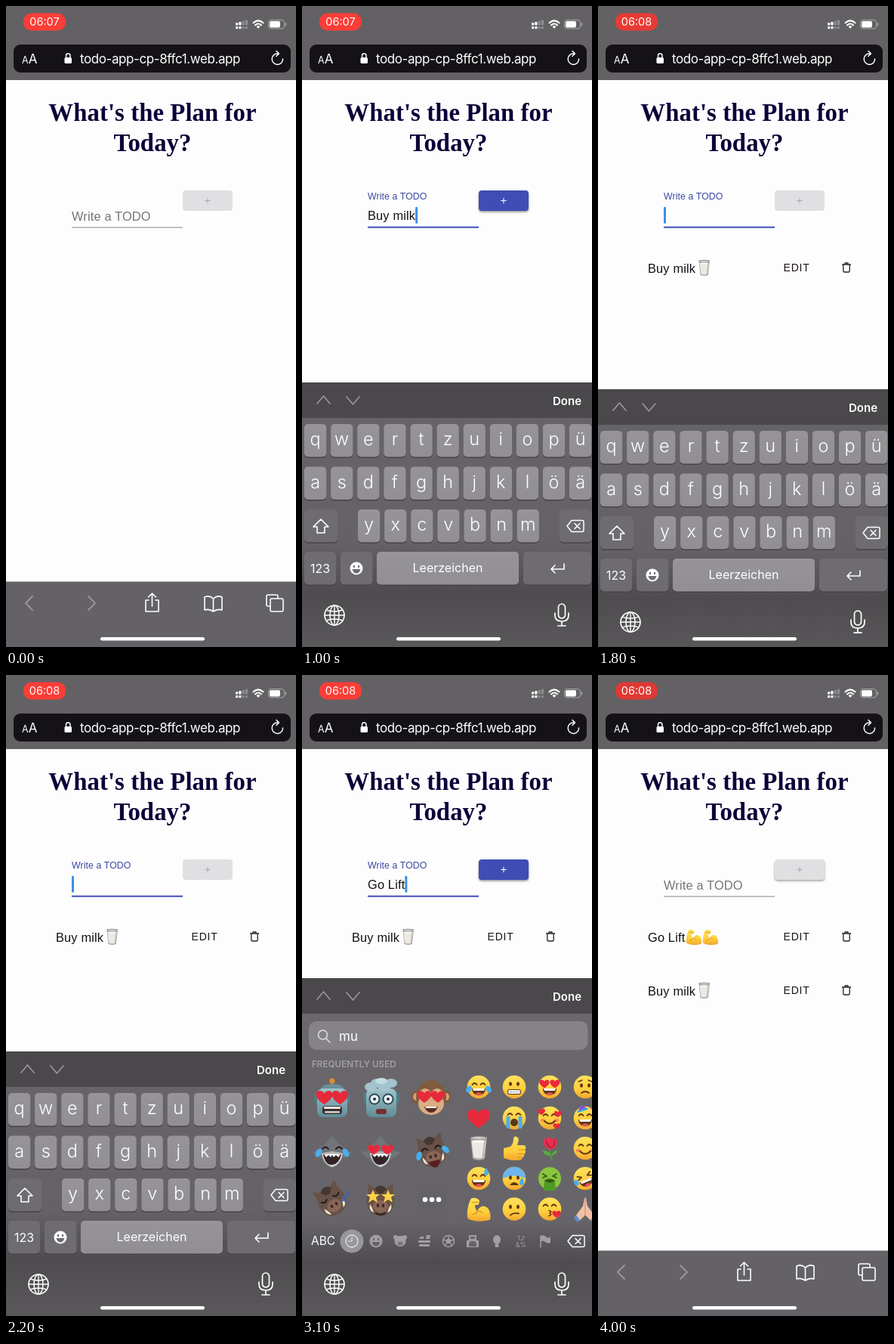
Recreate the animation shown at these times as an HTML page. Size 384 px wide and 848 px high, loop 4100 ms.

```html
<!DOCTYPE html>
<html lang="en">
<head>
<meta charset="utf-8">
<title>Todo app</title>
<style>
html, body { margin: 0; width: 100%; height: 100%; overflow: hidden; background: #fdfdfd; }
svg { display: block; }
text { white-space: pre; }
.ui { font-family: Inter, Roboto, sans-serif; }
.web { font-family: "Liberation Sans", Arial, sans-serif; letter-spacing: .15px; font-size: 16.4px; }
.head { font: bold 32.8px "Liberation Serif", "Times New Roman", serif; letter-spacing: .06px; }
</style>
</head>
<body>
<svg id="stage" width="384" height="848" viewBox="0 0 384 848"></svg>
<script>
const LOOP = 4100, STEP = 100;
const WHITE = '#fff', BLUE = '#3f4db5', BROWN = '#5f3713', TEAR = '#4aaef0', RED = '#e8293c';

const fill = (d, c, more = '') => `<path d="${d}" fill="${c}" ${more}/>`;
const line = (d, c, w = 1.6, more = '') =>
  `<path d="${d}" fill="none" stroke="${c}" stroke-width="${w}" stroke-linecap="round" stroke-linejoin="round" ${more}/>`;
const box = (x, y, w, h, r, c, more = '') => `<rect x="${x}" y="${y}" width="${w}" height="${h}" rx="${r}" fill="${c}" ${more}/>`;
const dot = (x, y, rx, c, ry = rx) => `<ellipse cx="${x}" cy="${y}" rx="${rx}" ry="${ry}" fill="${c}"/>`;
const ring = (x, y, r, c, w = 1.6) => `<circle cx="${x}" cy="${y}" r="${r}" fill="none" stroke="${c}" stroke-width="${w}"/>`;
const at = (x, y, s, body) => `<g transform="translate(${x} ${y}) scale(${s})">${body}</g>`;
const turn = (deg, body) => `<g transform="rotate(${deg})">${body}</g>`;
const label = (x, y, size, str, c = WHITE, more = '') =>
  `<text class="ui" x="${x}" y="${y}" font-size="${size}" fill="${c}" ${more}>${str}</text>`;
const mid = (x, y, size, str, c = WHITE, more = '') => label(x, y, size, str, c, 'text-anchor="middle" ' + more);
const grad = (id, stops) => `<linearGradient id="${id}" x2="0" y2="1">` +
  stops.map(([o, c]) => `<stop offset="${o}" stop-color="${c}"/>`).join('') + '</linearGradient>';
const both = f => f(-1) + f(1);

// Emoji, drawn around 0,0 in a 32px box
const heart = (x, y, s) => at(x, y, s, fill('M0 10C-6 6-12 1-12-4C-12-11-3-12 0-6C3-12 12-11 12-4C12 1 6 6 0 10Z', RED));
const eyes = (y = -3, ry = 2.7) => both(k => dot(5 * k, y, 2, BROWN, ry));
const shut = (y = -3) => both(k => line(`M${5.5 * k - 3} ${y}q3-4 6 0`, BROWN, 1.8));
const grin = fill('M-9 2H9C9 14-9 14-9 2Z', BROWN) + fill('M-8 2H8L7 5H-7Z', WHITE) + fill('M-5 9.5Q0 5 5 9.5Q0 12 -5 9.5Z', '#ee5361');
const smile = line('M-7 4Q0 11 7 4', BROWN, 1.9);
const frown = line('M-5 8Q0 4 5 8', BROWN, 1.9);
const blush = both(k => dot(9 * k, 3, 3.2, '#f58a57', 2));
const face = (...parts) => '<circle r="15.3" fill="url(#yel)"/>' + parts.join('');
const drip = (x, y) => at(x, y, 1, fill('M0-5C4 0 4 5 0 5S-4 0 0-5Z', TEAR));

const emoji = {
  joy: face(shut(), grin, both(k => at(k * 13, 3, 1, turn(k * -35, dot(0, 0, 3.3, TEAR, 5))))),
  grimace: face(eyes(-4), box(-9, 3, 18, 7, 3, BROWN), box(-8, 4, 16, 5, 2, WHITE), line('M-8 6.5H8M-4 4V9M0 4V9M4 4V9', '#aaa', .7)),
  love: face(heart(-7, -4, .55), heart(7, -4, .55), grin),
  sad: face(eyes(-2), frown, line('M-9-7L-4-9M9-7L4-9', BROWN, 1.4)),
  heart: heart(0, 1, 1.25),
  sob: face(shut(-4), dot(0, 6, 5, BROWN, 5), both(k => fill(`M${k * 8 - 2.5}-2h5V13q-2 2-5 0Z`, TEAR))),
  adore: face(shut(), blush, smile, heart(-11, -8, .42), heart(11, -5, .42), heart(9, 11, .38)),
  party: face(shut(), grin, fill('M-10-8L-5-18L3-12Z', '#7c5ad6'), line('M-10-8L3-12', '#38b5e8', 2), dot(8, -13, 1.5, '#ed4a7b'), dot(13, -8, 1.5, '#46b96a')),
  sweat: face(shut(), grin, drip(10, -9)),
  thumb: fill('M-14 0L-5-2C-2-5-1-9-1-13C0-17 5-16 6-11L4-4H12C16-4 16 1 14 2C16 4 15 7 13 8C14 11 12 12 11 12C11 15 8 16 5 16H-4L-14 13Z', 'url(#yel)') +
    line('M6 2H13M5 7.5H12M5 12H10', '#d8901c', 1),
  rose: line('M1-2Q-1 8 3 15', '#4b9f3a', 2) + fill('M1 10Q-9 9-9 3Q0 3 1 10ZM2 10Q10 8 10 3Q3 4 2 10Z', '#55ad44') +
    fill('M-9-13Q-4-11-2-15Q3-11 9-13Q12-1 2 2Q-9 1-9-13Z', '#e6304f') + line('M-5-10Q-3-1 3-1Q8-5 6-10', '#aa1735', 1.2),
  blush: face(shut(), blush, smile),
  arm: fill('M-10-14C-6-16 0-14 1-11L0-6C-2-5-4-6-5-5C-5-1-3 1-2 3C1-5 9-6 13 0C16 6 16 11 15 14C6 17-6 17-14 13C-17 8-14-8-10-14Z', 'url(#yel)') +
    line('M-9-9H-1M-2 3Q-4 7-8 7M-2 3Q3 2 5 5', '#d38a18', 1.1),
  worry: face(fill('M-15.3 0A15.3 15.3 0 0 1 15.3 0Q0-7-15.3 0Z', '#6fb4ec'), eyes(-1), fill('M-6 9Q0 1 6 9Z', BROWN), drip(10, 4)),
  sick: '<circle r="15" fill="#8bc53f"/>' + line('M-9-6L-4-3L-9-1M9-6L4-3L9-1', '#355912', 1.8) + fill('M-7 2H7L8 16H-8Z', '#4e9a25') + dot(0, 3, 6, '#355912', 2.5),
  rofl: turn(-22, face(line('M-9-6L-4-3L-9-1M9-6L4-3L9-1', BROWN, 1.8), grin, dot(-13, 1, 3, TEAR, 4), dot(13, 1, 3, TEAR, 4))),
  milk: fill('M-11-15H11L8 14Q0 18-8 14Z', '#aaa6a8') + fill('M-9.5-9H9.5L6.8 12Q0 15-6.8 12Z', '#ece8e2') + dot(0, -14, 11, '#8f8c90', 2.2) +
    dot(0, -13.6, 9, '#d8d6d9', 1.3) + dot(0, -9, 9, '#fffdf7', 1.6) + line('M8-9L5.5 12', '#bdb7b2', 2),
  unsure: face(eyes(), line('M-5 8Q0 4 6 6', BROWN, 1.9)),
  kiss: face(shut(-4), line('M-1 2Q4 3 0 5Q4 7-1 9', BROWN, 1.7), heart(9, 7, .48)),
  pray: fill('M-1-15L-3-4L-12 8L-7 15L0 8L7 15L12 8L3-4L1-15Z', '#f1bfa5') + line('M0-14V8', '#c88767', 1) + fill('M-12 8L-7 15L-11 17L-15 11ZM12 8L7 15L11 17L15 11Z', '#5a8fd0')
};

// Larger animal and robot heads
const hearts = (x, y, s) => both(k => heart(k * x, y, s));
const tears = both(k => at(k * 18, 2, 1, turn(k * -30, dot(0, 0, 3.6, TEAR, 6))));
const darkShut = both(k => line(`M${k * 9 - 4}-3q4-5 8 0`, '#21191a', 2));
const jaw = box(-13, 10, 26, 11, 4, '#3b2f34') + box(-11, 11, 22, 3, 1, '#e9e4da') + box(-10, 17, 20, 2.5, 1, '#d9d2c8');
const skull = box(-24, -9, 48, 17, 6, '#4f7d86') + box(-20, -13, 40, 38, 8, 'url(#steel)');
const ear = (c, inner) => both(k => dot(k * 20, -2, 6.5, c, 8) + dot(k * 20, -2, 4, inner, 5));
const shark = fill('M0-20Q6-15 7-11Q15-8 17 0L26 1Q22 8 15 9Q10 19 0 22Q-10 19-15 9Q-22 8-26 1L-17 0Q-15-8-7-11Q-6-15 0-20Z', '#717478') +
  fill('M-14 3Q0-2 14 3Q11 18 0 21Q-11 18-14 3Z', '#d3d4d6') + fill('M-12 4Q0 0 12 4Q9 17 0 18T-12 4Z', '#332326') +
  fill('M-11 4Q0 1 11 4L8 8L5 5L2 8L0 5L-2 8L-5 5L-8 8Z', WHITE);
const hog = fill('M-16-12L-17-22L-7-16Q0-20 7-16L17-22L16-12Q22 6 12 17Q0 24-12 17Q-22 6-16-12Z', '#685247') +
  fill('M-8-15Q0-24 8-15L3-9H-3Z', '#463730') + dot(0, 8, 10, '#8a6657', 8) +
  both(k => dot(k * 3.5, 7, 1.8, '#412a24', 2.4) + fill(`M${k * 9} 16Q${k * 16} 14 ${k * 14} 5Q${k * 11} 9 ${k * 9} 16Z`, '#ece4d2'));
const star = (x, y) => at(x, y, 1, fill('M0-9L2.5-3L9-3L4 1L6 8L0 4L-6 8L-4 1L-9-3L-2.5-3Z', '#ffd34a'));

const heads = [
  [40, 560, line('M0-16V-22', '#8a8d8c', 3) + dot(0, -23, 3.6, '#e08a2e') + fill('M-16-10Q-15-19 0-19T16-10Z', '#6c8e96') + skull + hearts(10.5, -1, .9) + jaw],
  [105, 560, skull + [-14, -6, 4, 13].map((x, i) => dot(x, -15 - i % 2 * 5, 8, '#a3c3cf', 6)).join('') + dot(0, -23, 8, '#c3dbe3', 4) +
    both(k => dot(k * 9, 1, 7.5, '#2f4a56') + dot(k * 9, 1, 5.5, '#e8f2f4') + dot(k * 9, 1, 2, '#27333a')) + box(-7, 14, 14, 7, 3, '#742f34')],
  [171, 560, ear('#7d593b', '#d2a078') + dot(0, -1, 20, '#805c3d', 23) + dot(0, 7, 17, '#d9ad84', 15) + both(k => dot(k * 8, -4, 8.5, '#d9ad84', 9)) +
    hearts(9, -2, .78) + fill('M-9 11H9Q6 19 0 19T-9 11Z', '#5a2c25') + line('M-6.5 12H6.5', WHITE, 1.8)],
  [40, 630, shark + darkShut + tears],
  [104, 630, shark + hearts(9, -2, .65)],
  [172, 630, turn(-14, hog + darkShut + fill('M-8 13H8Q5 22 0 22T-8 13Z', '#5a1d22') + tears)],
  [39, 695, turn(-30, hog + both(k => line(`M${k * 9 - 4}-4q4 4 8 0`, '#21191a', 2))) + label(13, 1, 12, 'z', '#3f62c8', 'font-weight="700"') + label(19, -6, 10, 'z', '#3f62c8', 'font-weight="700"')],
  [104, 695, hog + star(-10, -5) + star(10, -5) + line('M-6 17Q0 21 6 17', '#2c1c19', 2)],
  [172, 694, dot(0, 0, 20, '#646267') + [-9, 0, 9].map(x => dot(x, 0, 3.3, WHITE)).join('')]
];

const trash = line('M-5.5-4H5.5M-4.2-4V4Q-4.2 6-2.5 6H2.5Q4.2 6 4.2 4V-4M-2-4V-6H2V-4', '#222', 1.3);
const erase = line('M-11 0L-5-7.5H9Q11-7.5 11-5.5V5.5Q11 7.5 9 7.5H-5ZM-1-3.5L6 3.5M6-3.5L-1 3.5', WHITE, 1.5);
const globe = ring(0, 0, 13, WHITE) + '<ellipse rx="6" ry="13" fill="none" stroke="#fff" stroke-width="1.5"/>' + line('M-13 0H13M0-13V13M-11-7Q0-3 11-7M-11 7Q0 3 11 7', WHITE, 1.4);
const mic = '<rect x="-4.5" y="-15" width="9" height="19" rx="4.5" fill="none" stroke="#fff" stroke-width="1.7"/>' + line('M-9-3V0Q-9 8 0 8T9 0V-3M0 8V14M-5 14H5', WHITE, 1.7);
const happy = (c, bg) => dot(0, 0, 8.5, c) + both(k => dot(k * 3, -2.5, 1.2, bg, 1.8)) + fill('M-5.5 1H5.5Q4 6.5 0 6.5T-5.5 1Z', bg);

const dock = at(43, 806, 1, globe) + at(344, 806, 1, mic);
const bar = y => box(0, y, 384, 47, 0, '#4a484b') +
  line(`M20 ${y + 28}L28.5 ${y + 18}L37 ${y + 28}M59 ${y + 19}L67.5 ${y + 29}L76 ${y + 19}`, '#98969a', 1.7) +
  label(332, y + 29.5, 15, 'Done', WHITE, 'font-weight="600"');

const key = (x, y, w, c, body) => box(x, y + 1, w, 44, 5, '#454347') + box(x, y, w, 43.5, 5, c) + body;
const keyRow = (str, x0, y) => [...str].map((c, i) => {
  const x = x0 + i * 35.1;
  return key(x, y, 29.3, 'url(#key)', mid(x + 14.6, y + 28.3, 23.5, c, WHITE, 'font-weight="300"'));
}).join('');
const DARK = '#6e6c70';
const keyboard = box(0, 498, 384, 500, 0, '#5a585b') + box(0, 498, 384, 350, 0, 'url(#tray)') + bar(498) +
  keyRow('qwertzuiopü', 3, 553) + keyRow('asdfghjklöä', 3, 609.5) + keyRow('yxcvbnm', 74, 666) +
  key(3, 666, 44, DARK, line('M25 679L15 689H20V697H30V689H35Z', WHITE, 1.6)) +
  key(341, 666, 43, DARK, at(362, 688, 1, erase)) +
  key(3, 722, 42, DARK, mid(24, 749.5, 16, '123')) +
  key(51, 722, 42.5, DARK, at(72, 744, 1, happy(WHITE, DARK))) +
  key(99, 722, 188, 'url(#key)', mid(193, 749, 16, 'Leerzeichen')) +
  key(293, 722, 90, DARK, line('M347 738V745H330M335 740L330 745L335 750', WHITE, 1.6)) + dock;

const G = '#a09ea3', GAP = '#666468';
const tabs = [
  happy(G, GAP),
  both(k => dot(k * 6, -5, 3, G)) + dot(0, 0, 7.5, G, 7) + dot(0, 3, 3.5, '#777579', 2.5),
  box(-8, -1, 16, 3, 1, G) + box(-7, 4, 14, 3, 1, G) + fill('M-7-3Q-5-7-1-6V-3ZM2-3L3-8H8L7-3Z', G),
  ring(0, 0, 7.5, G, 1.5) + fill('M0-4L4-1L2.5 3H-2.5L-4-1Z', G) + line('M0-4V-7M4-1L7-2M2.5 3L5 6M-2.5 3L-5 6M-4-1L-7-2', G, 1.4),
  fill('M-8 8V-1H-5V-8H5V-1H8V8Z', G) + fill('M-5 4L-3.5 0H3.5L5 4V7H-5Z', GAP) + box(-3, -6, 6, 3, 0, GAP),
  dot(0, -2, 5, G, 6) + box(-2.5, 4, 5, 4, 1, G),
  mid(0, -1, 8, 'T♪', G) + mid(0, 8, 8.5, '&amp;%', G),
  line('M-6-7V8', G, 1.5) + fill('M-6-7Q-2-9 1-6T7-6V2Q3 4 0 1T-6 1Z', G)
];
const COLS = [234, 281, 328, 375], ROWS = [545, 586, 626, 666, 706.5];
const put = (name, x, y, s = 1) => at(x, y, s, emoji[name]);
const grid = ['grimace sob thumb worry unsure', 'love adore rose sick kiss', 'sad party blush rofl pray']
  .map((col, i) => col.split(' ').map((n, j) => put(n, COLS[i + 1], ROWS[j])).join('')).join('');
const recent = order => put('joy', COLS[0], ROWS[0]) + put('heart', COLS[0], ROWS[1]) +
  order.map((n, i) => put(n, COLS[0], ROWS[i + 2])).join('');
const picker = box(0, 401, 384, 600, 0, '#5a585b') + box(0, 401, 384, 447, 0, 'url(#tall)') + bar(401) +
  box(9, 458, 369.5, 38, 10, '#858387') + ring(27.5, 476, 6, '#dddcdf', 1.6) + line('M32 481L37 486', '#dddcdf') +
  label(49, 483.5, 17, 'mu') + label(13, 518.5, 11.7, 'FREQUENTLY USED', '#a19fa4', 'font-weight="600"') +
  heads.map(([x, y, b]) => at(x, y, 1, b)).join('') + grid + '<g id="recent"></g>' +
  label(12, 754, 15.5, 'ABC') + dot(66, 749, 15.5, '#99979b') + ring(66, 749, 8, '#e5e4e7', 1.3) + line('M66 744V749H61', '#e5e4e7', 1.2) +
  tabs.map((b, i) => at(98 + i * 32, 749, 1, b)).join('') + at(363, 749, 1, erase) + dock;

const toolbar = box(0, 761.5, 384, 87, 0, '#646266') +
  line('M35 781L26 790L35 799M109 781L118 790L109 799', '#99979b', 1.8) +
  line('M189 786H185V801H202V786H198M193.5 794V777M188.5 782L193.5 777L198.5 782', WHITE, 1.6) +
  line('M274.5 784Q269 779 263 782V799Q269 797 274.5 801Q280 797 286 799V782Q280 779 274.5 784V801', WHITE, 1.6) +
  line('M350 794H347Q345 794 345 792V781Q345 779 347 779H358Q360 779 360 781V784M352 784H365Q367 784 367 786V799Q367 801 365 801H352Q350 801 350 799V786Q350 784 352 784Z', WHITE, 1.6);

const signal = [0, 1, 2, 3].map(i => {
  const c = i < 2 ? WHITE : '#8d8b8e', h = 3.2 + i * 1.3;
  return box(304 + i * 4.3, 25.5 - h, 3.2, h, .9, c) + box(304 + i * 4.3, 27, 3.2, 3.2, .9, c);
}).join('');
const header = box(0, 0, 384, 98, 0, '#636164') + box(23, 9.5, 56, 23, 11, '#fb3d37', 'id="pill"') +
  '<text id="clock" class="ui" x="51" y="26.3" font-size="14.5" fill="#fff" text-anchor="middle"></text>' + signal +
  line('M327.5 22.3Q334 16.5 340.5 22.3M330 25.3Q334 21.7 338 25.3', WHITE, 2.1) + fill('M331.5 27Q334 25 336.5 27L334 30Z', WHITE) +
  '<rect x="347.5" y="18.5" width="21" height="11.5" rx="3.4" fill="none" stroke="#a9a8ab"/>' + box(349, 20, 14, 8.5, 2, WHITE) + box(369.7, 22, 1.5, 4.5, .7, '#a9a8ab') +
  box(10, 51, 367, 37, 9, '#141216') + label(21, 76, 12.5, 'A') + label(29.8, 76, 17, 'A') +
  box(77.5, 68, 9.5, 8, 1.6, WHITE) + line('M79.5 68V65.5Q79.5 63 82.2 63T85 65.5V68', WHITE, 1.5) +
  mid(204, 76, 17, 'todo-app-cp-8ffc1.web.app', WHITE, 'letter-spacing="-.4"') +
  line('M366.6 70A7.2 7.2 0 1 1 359.5 63H361M358 59.5L361.5 63L358 66.5', WHITE, 1.5);

const page = '<g class="head" text-anchor="middle" fill="#0a0238"><text x="194" y="152">What\'s the Plan for</text><text x="194" y="192">Today?</text></g>' +
  '<text id="hint" class="web" x="87">Write a TODO</text><rect id="rule" x="87" width="147"/>' +
  box(234, 246, 66, 26.5, 4, '#000', 'id="shade" filter="url(#soft)"') + box(234, 244, 66, 27, 4, BLUE, 'id="add"') +
  line('M263.7 257.5H270.3M267 254.2V260.8', WHITE, 1.1, 'id="plus"') +
  '<text id="typed" class="web" x="87" y="283.3" fill="#111"></text><g id="tail"></g><rect id="caret" y="265.8" width="3" height="22" rx="1.2" fill="#3b90e6"/><g id="list"></g>';

const svg = document.getElementById('stage');
svg.innerHTML = '<defs>' + grad('yel', [[0, '#ffe25c'], [.6, '#fece3c'], [1, '#f3a630']]) + grad('steel', [[0, '#9fc3ca'], [1, '#5f8c96']]) +
  grad('key', [[0, '#969498'], [1, '#918f93']]) + grad('tray', [[0, '#666468'], [.6, '#646266'], [.79, '#4e4c4f'], [1, '#5a585b']]) +
  grad('tall', [[0, '#6a686c'], [.72, '#666468'], [.84, '#4e4c4f'], [1, '#5a585b']]) +
  '<filter id="soft" x="-10%" y="-30%" width="120%" height="170%"><feGaussianBlur stdDeviation="1.4"/></filter></defs>' +
  box(0, 0, 384, 848, 0, '#fdfdfd') + page + toolbar + `<g id="keys">${keyboard}</g><g id="picker">${picker}</g>` + header + box(125, 835, 138, 4.6, 2.3, WHITE);

const $ = id => document.getElementById(id);
const set = (id, attrs) => { for (const k in attrs) $(id).setAttribute(k, attrs[k]); };
const clamp = (v, a, b) => Math.min(b, Math.max(a, v));
const rise = (t, start) => 350 * Math.pow(1 - clamp((t - start) / 284, 0, 1), 3);

const row = (str, tail, width, y) => `<text class="web" x="66" y="${y}" fill="#111">${str}</text>` +
  tail.map((n, i) => put(n, 66 + width + 11.5 + 22 * i, y - 6, .66)).join('') +
  `<text class="web" x="245.5" y="${y - 1.5}" style="font-size:14px;letter-spacing:.8px" fill="#1c1418">EDIT</text>` + at(329, y - 6.5, 1, trash);

function state(t) {
  const second = t >= 1600, sent = t >= 3800;
  const n = Math.floor((t - (second ? 2200 : 200)) / STEP);
  const text = sent ? '' : (second ? 'Go Lift' : 'Buy milk').slice(0, Math.max(0, n));
  const tail = sent ? [] : second ? ['arm', 'arm'].slice(0, (t >= 3300) + (t >= 3500)) : t >= 1400 ? ['milk'] : [];
  const picking = (t >= 1200 && t < 1600) || t >= 3000;
  const drop = picking ? 460 * Math.pow(clamp((t - 3700) / 300, 0, 1), 2) : rise(t, second ? 1600 : 100);
  const focus = (t >= 200 && t < 1600) || (t >= 1700 && t < 3900);
  return { t, text, tail, picking, drop, focus, second, sent };
}

function draw(s) {
  const live = s.text.length > 0, dim = Math.max(0, 1 - Math.abs(s.t - 1650) / 450, 1 - Math.abs(s.t - 4000) / 280);
  $('clock').textContent = s.t < 1700 ? '06:07' : '06:08';
  set('pill', { fill: `rgb(${251 - 28 * dim},${61 - 4 * dim},${55 - 3 * dim})` });
  const up = s.focus || live;
  set('hint', { y: up ? 256 : 283.5, fill: s.focus ? '#3b489f' : '#757478', style: up ? 'font-size:12.3px;letter-spacing:.11px' : '' });
  set('rule', { y: s.focus ? 291.7 : 292.5, height: s.focus ? 2 : 1, fill: s.focus ? BLUE : '#858487' });
  set('add', { fill: live ? BLUE : '#e0dfe1' });
  set('plus', { stroke: live ? WHITE : '#a9a8ab' });
  set('shade', { opacity: live ? .45 : s.sent ? .38 : 0 });
  $('typed').textContent = s.text;
  const end = 87 + (live ? $('typed').getComputedTextLength() : 0);
  $('tail').innerHTML = s.tail.map((n, i) => put(n, end + 11.5 + 22 * i, 277, .66)).join('');
  set('caret', { x: end + 22 * s.tail.length, opacity: s.focus ? 1 : 0 });
  $('list').innerHTML = (s.sent ? row('Go Lift', ['arm', 'arm'], 49.4, 352.5) : '') +
    (s.second ? row('Buy milk', ['milk'], 63.2, s.sent ? 423.5 : 352.5) : '');
  $('recent').innerHTML = recent(s.second ? ['milk', 'sweat', 'arm'] : ['sweat', 'arm', 'milk']);
  set('keys', { transform: `translate(0 ${s.drop})`, visibility: s.picking ? 'hidden' : 'visible' });
  set('picker', { transform: `translate(0 ${s.drop})`, visibility: s.picking ? 'visible' : 'hidden' });
}

let last = -1;
const begin = performance.now();
function tick() {
  const t = Math.floor(((performance.now() - begin) % LOOP) / STEP) * STEP;
  if (t !== last) draw(state(last = t));
  requestAnimationFrame(tick);
}
tick();
</script>
</body>
</html>
```
